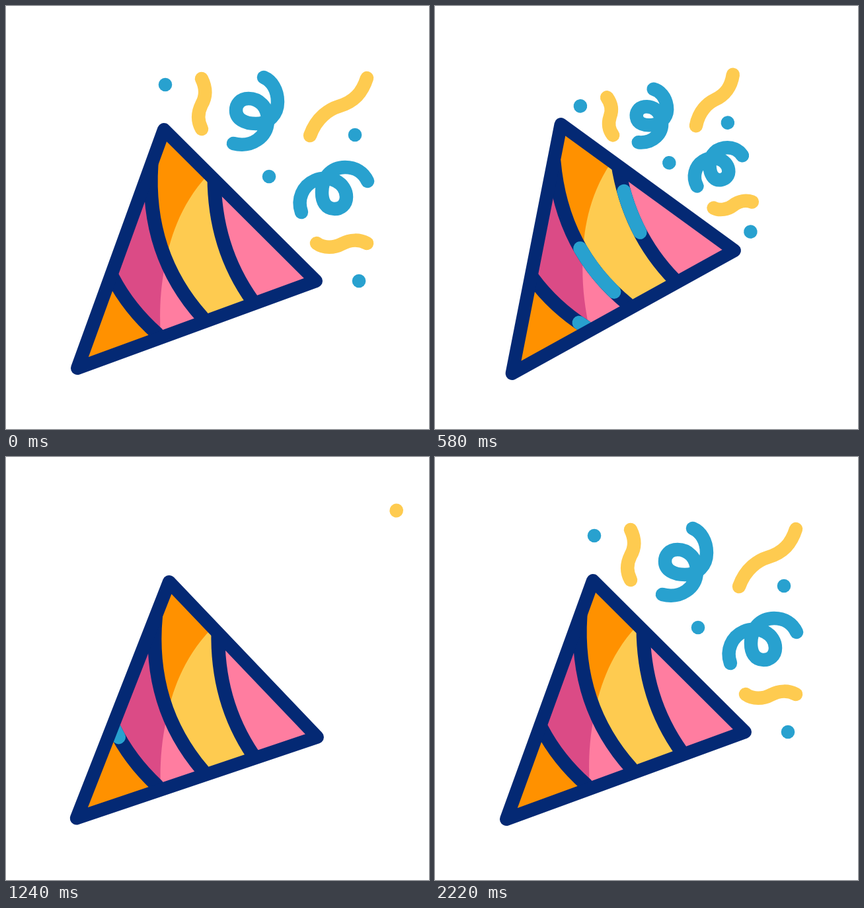
Recreate the animation shown at these times as an HTML page with a canvas. Size 640 by 640 pixels, loop 2.42 s.

```html
<!DOCTYPE html>
<html lang="en">
<head>
<meta charset="utf-8">
<title>Party popper</title>
<style>
  html, body { margin: 0; width: 100%; height: 100%; overflow: hidden; background: #fff; }
  canvas { display: block; width: 640px; height: 640px; }
</style>
</head>
<body>
<canvas width="640" height="640"></canvas>
<script>
const ctx = document.querySelector('canvas').getContext('2d');
const NAVY = '#042974', BLUE = '#28a1cf', YELLOW = '#fecb50',
      ORANGE = '#ff9100', PINK = '#ff7da0', MAGENTA = '#db4b86';
const LOOP = 2420, MOVING = 2220, TICK = 20;

const ease = x => { x = Math.min(1, Math.max(0, x)); return x * x * (3 - 2 * x); };

function curve(d) {
  const el = document.createElementNS('http://www.w3.org/2000/svg', 'path');
  el.setAttribute('d', d);
  return { path: new Path2D(d), length: el.getTotalLength() };
}

const stripe = (x0, y0, cx, cy, x1, y1, delay, dark, light) => {
  const d = `M${x0} ${y0}Q${cx} ${cy} ${x1} ${y1}`;
  return { ...curve(d), region: new Path2D(`${d}V640H0V0H${x0}Z`), delay, dark, light };
};
const stripes = [
  stripe(315, 258, 315, 365, 373, 446, 5.2, ORANGE, YELLOW),
  stripe(220, 240, 211, 375, 297, 471, 15.5, MAGENTA, PINK),
  stripe(161, 410, 186, 458, 229, 496, 25.7, ORANGE, ORANGE)
];
const cone = new Path2D('M239 187L469 416L108 548Z');
const litSide = new Path2D('M305 256C262 302 247 356 240 395C233 432 232 465 234 500V640H640V256Z');

// Streamers run from tail to tip; start is the launch tick.
const streamer = (start, color, d) => ({ start, color, ...curve(d) });
const dot = (start, x, y) => ({ start, x, y });
const confetti = [
  streamer(33, BLUE, 'M447 312C440 292 449 272 467 264C490 254 515 268 515 289C515 301 506 307 497 307C484 307 478 296 478 282C478 260 492 244 513 244C529 244 541 252 547 265'),
  streamer(35.5, BLUE, 'M344 208C372 215 395 198 396 174C397 152 382 140 367 140C354 140 348 149 348 158C348 171 361 178 378 178C398 178 411 164 411 145C411 127 402 113 390 108'),
  streamer(35.5, YELLOW, 'M296 186C289 173 290 161 296 149C303 137 303 124 296 110'),
  streamer(38, YELLOW, 'M470 359C481 367 497 366 508 360C521 353 535 353 546 359'),
  streamer(39, YELLOW, 'M460 196C470 168 490 156 503 152C527 145 539 131 546 109'),
  dot(35.5, 241, 119), dot(33, 528, 195), dot(36.5, 398, 258), dot(38, 534, 416)
];

function strokePart({ path, length }, from, to, color, width) {
  from = Math.max(0, from);
  to = Math.min(1, to);
  if (to <= from) return;
  ctx.strokeStyle = color;
  ctx.lineWidth = width;
  ctx.setLineDash([(to - from) * length + (to === 1 ? 1 : 0), 9999]);
  ctx.lineDashOffset = -from * length;
  ctx.stroke(path);
  ctx.setLineDash([]);
}

function scaleAbout(x, y, s) {
  ctx.translate(x, y);
  ctx.scale(s, s);
  ctx.translate(-x, -y);
}

function drawConfetti(item, n) {
  const out = ease((n - item.start) / 24);
  const back = ease((n - item.start - 45.5) / 26.5);
  const leaving = out < 1;
  const size = leaving ? 1 - 0.262 * ease(n / item.start) + 0.46 * out : 0.7 + 0.3 * back;
  if (!leaving && !back) return;
  ctx.save();
  if (leaving) scaleAbout(372, 308, size);
  else scaleAbout(350, 352, size);
  if (item.path) {
    strokePart(item, leaving ? out : 0, leaving ? 1 : back, item.color, 20.5 / size);
  } else {
    const grow = leaving ? 1 - ease((out - 0.6) / 0.4) : ease((n - item.start - 49.5) / 20);
    ctx.fillStyle = BLUE;
    ctx.beginPath();
    ctx.arc(item.x, item.y, 10.3 * grow / size, 0, 2 * Math.PI);
    ctx.fill();
  }
  ctx.restore();
}

function drawCone(n) {
  ctx.save();
  ctx.clip(cone);
  ctx.fillStyle = PINK;
  ctx.fill(cone);
  for (const s of stripes) {
    ctx.save();
    ctx.clip(s.region);
    ctx.fillStyle = s.dark;
    ctx.fillRect(0, 0, 640, 640);
    ctx.fillStyle = s.light;
    ctx.fill(litSide);
    ctx.restore();
  }
  for (const s of stripes) {
    strokePart(s, 0, 1, NAVY, 21);
    const head = 1 - (n - s.delay) / 30.5;
    strokePart(s, head, head + 10.2 / 30.5, BLUE, 21);
  }
  ctx.restore();
  ctx.strokeStyle = NAVY;
  ctx.lineWidth = 20;
  ctx.stroke(cone);
}

function draw(now) {
  const n = Math.min(now % LOOP, MOVING) / TICK;
  const tilt = -13.5 * ease(n / 48) + 19 * ease((n - 48) / 20) - 5.5 * ease((n - 68) / 12);
  ctx.fillStyle = '#fff';
  ctx.fillRect(0, 0, 640, 640);
  ctx.save();
  ctx.lineCap = ctx.lineJoin = 'round';
  ctx.translate(163.6, 496.5);
  ctx.rotate(tilt * Math.PI / 180);
  ctx.translate(-163.6, -496.5);
  for (const item of confetti) drawConfetti(item, n);
  drawCone(n);
  ctx.restore();
}

const begin = performance.now();
function frame() {
  draw(performance.now() - begin);
  requestAnimationFrame(frame);
}
frame();
</script>
</body>
</html>
```
